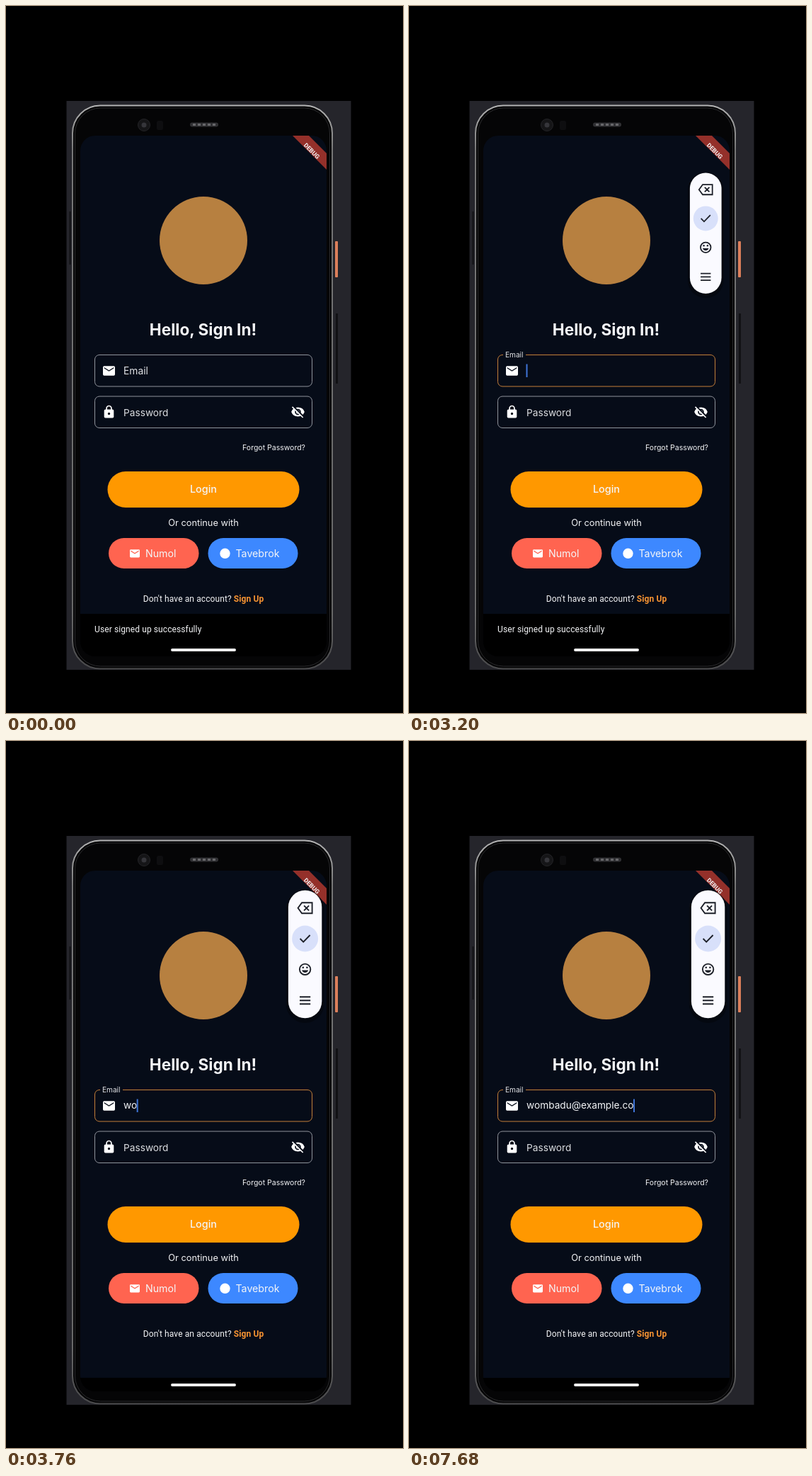
Recreate the animation shown at these times as an HTML page. Size 561 px wide and 998 px high, loop 8 s.

```html
<!DOCTYPE html>
<html lang="en">
<head>
<meta charset="utf-8">
<title>Sign in</title>
<style>
  html, body { margin: 0; width: 100%; height: 100%; overflow: hidden; background: #000; }
  svg { display: block; width: 100vw; height: 100vh; }
  text { font-family: Inter, sans-serif; fill: #f4f5f7; }
  .roboto { font-family: Roboto, sans-serif; font-size: 12px; letter-spacing: .1px; }
  .field { fill: none; stroke: #90939b; }
  .input { font-size: 13.7px; }
  .mid { text-anchor: middle; }
  .line { fill: none; stroke: #1d2029; stroke-width: 1.9; }
</style>
</head>
<body>
<svg viewBox="0 0 561 998">
  <defs>
    <linearGradient id="rim" x2="0" y2="1">
      <stop offset="0" stop-color="#b4b4b4"/>
      <stop offset=".08" stop-color="#777"/>
      <stop offset=".9" stop-color="#686868"/>
      <stop offset="1" stop-color="#4a4a4c"/>
    </linearGradient>
    <clipPath id="screen"><rect x="105" y="183" width="348" height="735" rx="21"/></clipPath>
    <path id="mail" d="M20 4H4a2 2 0 0 0-2 2v12a2 2 0 0 0 2 2h16a2 2 0 0 0 2-2V6a2 2 0 0 0-2-2zm0 4l-8 5-8-5V6l8 5 8-5z"/>
  </defs>

  <!-- Phone body -->
  <rect x="85.5" y="134" width="402" height="803" fill="#25252b"/>
  <path d="M90.5 290v75" stroke="#111114" stroke-width="2"/>
  <path d="M467.5 434v99" stroke="#111114" stroke-width="3"/>
  <rect x="465" y="332" width="4" height="51" rx="1" fill="#dc7f5b"/>
  <rect x="94" y="140.5" width="367" height="795" rx="39" fill="#050506" stroke="url(#rim)" stroke-width="2"/>
  <rect x="97.5" y="144" width="360" height="788" rx="36" fill="none" stroke="#29292b"/>
  <circle cx="195" cy="168" r="8.5" fill="#151517" stroke="#242427"/>
  <circle cx="195" cy="168" r="3.5" fill="#35353a"/>
  <rect x="213" y="162" width="9" height="13" rx="2" fill="#0e0e10"/>
  <path d="M263 167.5h34" stroke="#303033" stroke-width="6" stroke-linecap="round"/>
  <path d="M264 167.5h34" stroke="#67676a" stroke-width="3" stroke-dasharray="4 3"/>

  <g clip-path="url(#screen)">
    <rect x="105" y="183" width="348" height="735" fill="#060c18"/>
    <rect x="105" y="899" width="348" height="19" fill="#000"/>
    <circle cx="279" cy="331" r="62" fill="#b78040"/>

    <text class="mid" x="278.5" y="465" font-size="22.6" font-weight="700" fill="#fff">Hello, Sign In!</text>

    <!-- Form -->
    <rect id="emailBox" class="field" x="125.5" y="492.5" width="307" height="44.5" rx="6.5"/>
    <rect id="notch" y="490" height="5" fill="#060c18"/>
    <use href="#mail" transform="translate(135.3 504.8) scale(.85)" fill="#fff"/>
    <text id="label">Email</text>
    <text id="typed" class="input" x="166" y="519"></text>
    <rect id="caret" y="505.5" width="2" height="18.5" fill="#3f75d8"/>

    <rect class="field" x="125.5" y="551" width="307" height="44.5" rx="6.5"/>
    <path transform="translate(135.3 562.8) scale(.85)" fill="#fff" fill-rule="evenodd" d="M18 8h-1V6A5 5 0 0 0 7 6v2H6a2 2 0 0 0-2 2v10a2 2 0 0 0 2 2h12a2 2 0 0 0 2-2V10a2 2 0 0 0-2-2zM9 8V6a3 3 0 0 1 6 0v2zm3 5a2 2 0 0 1 0 4 2 2 0 0 1 0-4z"/>
    <text class="input" x="166" y="578.5" fill-opacity=".9">Password</text>
    <g transform="translate(402.3 562.8) scale(.85)">
      <path fill="#fff" fill-rule="evenodd" d="M1 12a11.8 11.8 0 0 1 22 0 11.8 11.8 0 0 1-22 0zm11-5a5 5 0 0 0 0 10 5 5 0 0 0 0-10zm0 2a3 3 0 0 1 0 6 3 3 0 0 1 0-6z"/>
      <path d="M4 2.2L22 20.2" stroke="#060c18" stroke-width="2.4"/>
      <path d="M2.6 3.6L20.4 21.4" stroke="#fff" stroke-width="1.8"/>
    </g>
    <text x="423" y="627" font-size="10.5" text-anchor="end">Forgot Password?</text>

    <rect x="143.5" y="657" width="271" height="51" rx="25.5" fill="#ff9800"/>
    <text class="mid" x="279" y="687" font-size="14.4" font-weight="500">Login</text>
    <text class="mid" x="279" y="734" font-size="12.8">Or continue with</text>

    <rect x="145" y="751" width="127.5" height="43" rx="21.5" fill="#ff6450"/>
    <use href="#mail" transform="translate(173.6 764.4) scale(.7)" fill="#fff"/>
    <text x="197" y="778" font-size="14.2">Numol</text>
    <rect x="285.5" y="751" width="127" height="43" rx="21.5" fill="#3d88ff"/>
    <circle cx="309.5" cy="772.8" r="7.2" fill="#fff"/>
    <text x="324.5" y="778" font-size="14.2">Tavebrok</text>

    <text class="roboto mid" x="279" y="840.5">Don't have an account? <tspan fill="#f79432" font-weight="700">Sign Up</tspan></text>

    <g id="snack">
      <rect x="105" y="858" width="348" height="70" fill="#000"/>
      <text id="snackText" class="roboto" x="125" y="883.5">User signed up successfully</text>
    </g>
    <rect x="233" y="907" width="92" height="4" rx="2" fill="#f0f0f0"/>

    <path d="M405 183h23l25 25v23z" fill="#94302a"/>
    <text class="mid" transform="translate(432 204.5) rotate(45)" y="3" font-size="8.6" font-weight="700" style="font-family: Roboto, sans-serif">DEBUG</text>

    <!-- Floating keyboard toolbar, drawn around its centre -->
    <g id="toolbar">
      <rect x="-27" y="-91" width="54" height="188" rx="27" fill="#000" opacity=".35"/>
      <rect x="-23.7" y="-90.3" width="47.4" height="180.6" rx="23.7" fill="#fafaff"/>
      <path class="line" d="M-4.5-72.7H10v15H-4.5L-10-65.2zM-1.5-68.7l7 7m0-7l-7 7"/>
      <circle cy="-22" r="18.5" fill="#d8e0fa"/>
      <path class="line" d="M-7-22l4.6 4.6L7-27"/>
      <circle class="line" cy="21.3" r="7.7"/>
      <path d="M-4.5 22.6h9a4.7 4.7 0 0 1-9 0z" fill="#1d2029"/>
      <circle cx="-2.8" cy="18.7" r="1.3" fill="#1d2029"/>
      <circle cx="2.8" cy="18.7" r="1.3" fill="#1d2029"/>
      <path class="line" d="M-7.6 60.3H7.6M-7.6 65.3H7.6M-7.6 70.3H7.6"/>
    </g>
  </g>
</svg>
<script>
  const LOOP = 8000;
  const EMAIL = "wombadu@example.co";
  // Time at which each character of EMAIL appears
  const KEY_TIMES = [3680, 3760, 3840, 3920, 4000, 4400, 4480, 5040, 5200,
                     5840, 5920, 6560, 6880, 6960, 7120, 7520, 7520, 7680];
  const CARET_OFF = [[0, 2800], [3280, 3600], [4880, 5040], [6000, 6400], [7280, 7520]];

  const el = id => document.getElementById(id);
  const set = (id, attrs) => {
    for (const name in attrs) el(id).setAttribute(name, attrs[name]);
  };
  const mix = (a, b, p) => a + (b - a) * p;
  const progress = (t, start, end) => Math.min(1, Math.max(0, (t - start) / (end - start)));
  const smooth = p => p * p * (3 - 2 * p);
  const easeOut = p => 1 - (1 - p) ** 3;

  function draw(t) {
    const focus = smooth(progress(t, 2800, 2990));
    set("label", {
      x: mix(166, 136, focus), y: mix(520, 496.3, focus),
      "font-size": mix(13.8, 10.1, focus), "fill-opacity": .92
    });
    set("notch", { x: mix(149, 133, focus), width: 32 * focus });
    el("emailBox").style.stroke =
      `rgb(${mix(144, 196, focus)} ${mix(147, 126, focus)} ${mix(155, 57, focus)})`;

    el("typed").textContent = EMAIL.slice(0, KEY_TIMES.filter(key => key <= t).length);
    set("caret", {
      x: 165.5 + el("typed").getComputedTextLength(),
      opacity: CARET_OFF.some(([from, to]) => t >= from && t < to) ? 0 : 1
    });

    const rise = easeOut(progress(t, 3200, 3400));
    set("toolbar", {
      transform: `translate(${mix(419.2, 422.6, rise)} ${mix(321, 301, rise)}) scale(${mix(.943, 1, rise)})`,
      opacity: progress(t, 3020, 3180)
    });

    const leave = progress(t, 3480, 3770);
    set("snack", {
      transform: `translate(0 ${41 * smooth(leave)})`
    });
    set("snackText", { opacity: 1 - progress(leave, .2, .65) });
  }

  function tick() {
    draw(performance.now() % LOOP);
    requestAnimationFrame(tick);
  }
  tick();
</script>
</body>
</html>
```
